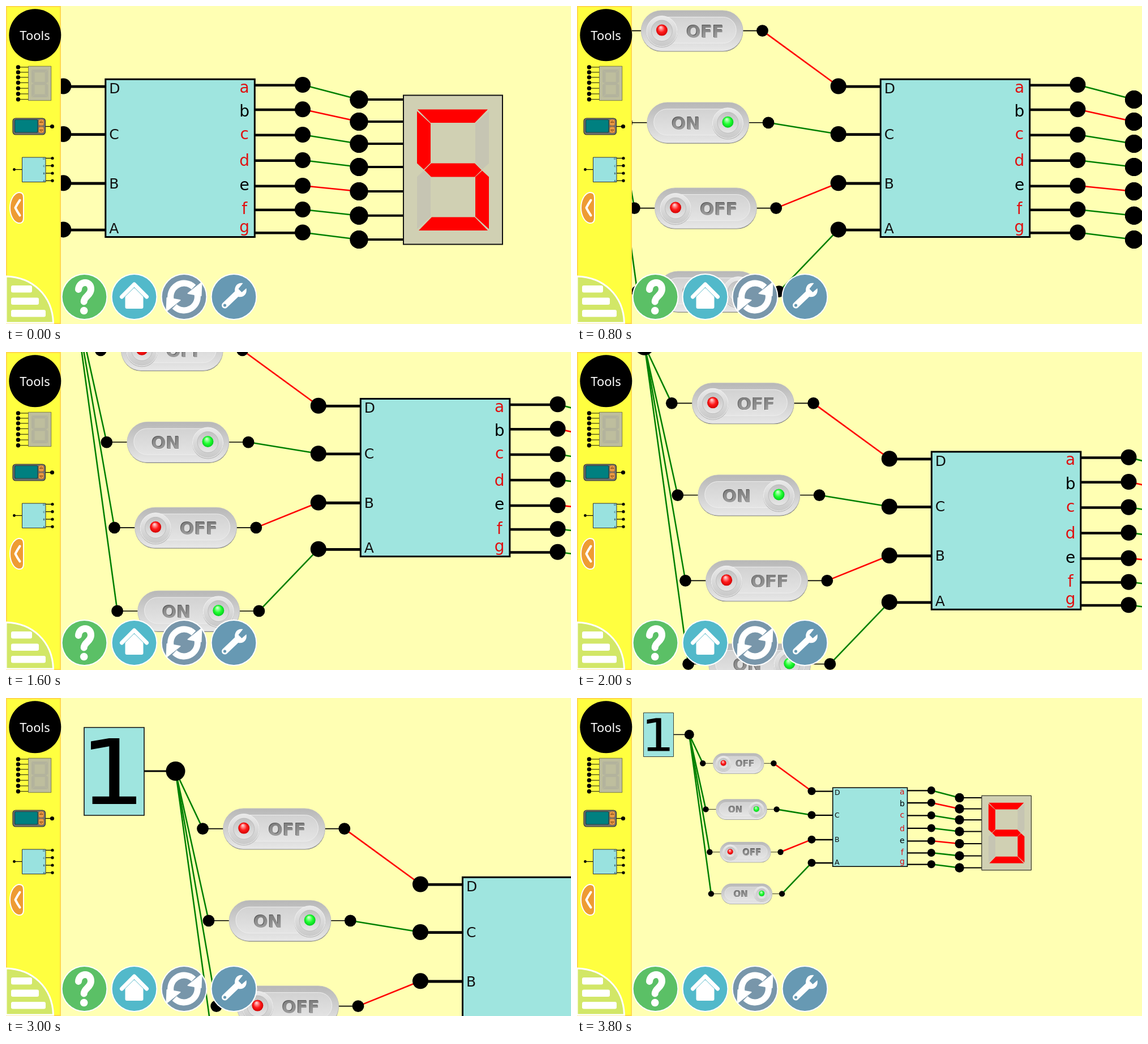
An HTML page with a canvas for the animation above (4400 ms loop, 998 by 561 pixels).

```html
<!DOCTYPE html>
<html lang="en">
<head>
<meta charset="utf-8">
<title>Seven segment circuit</title>
<style>
html, body { margin: 0; width: 100%; height: 100%; overflow: hidden; background: #ffffb3; }
canvas { display: block; }
</style>
</head>
<body>
<canvas id="stage" width="998" height="561"></canvas>
<script>
const ctx = document.getElementById('stage').getContext('2d');
const W = 998, H = 561, SIDE = 97, LOOP = 4400;
const CYAN = '#9fe5df', GREEN = '#008000', RED = '#ff0000';

// One pan per step, then two zoom-out steps.
const STEP = 200, PAN_X = (W - SIDE) / 10, PAN_Y = H / 12;
const MOVES = 'LLLLLDDUUULLUUU';

function cameraAt(time) {
  let col = 7, row = 4;
  for (const move of MOVES.slice(0, Math.floor(time / STEP))) {
    if (move === 'L') col--;
    else row += move === 'D' ? 1 : -1;
  }
  const zoom = time < 3400 ? 1 : time < 3800 ? 0.75 : 0.5;
  return { zoom, x: SIDE * (1 - zoom) - col * PAN_X, y: -row * PAN_Y };
}

// ---- drawing helpers ----
function paint(fill, stroke, width = 1) {
  if (fill) { ctx.fillStyle = fill; ctx.fill(); }
  if (stroke) { ctx.strokeStyle = stroke; ctx.lineWidth = width; ctx.stroke(); }
}
function disc(x, y, r, fill = '#000', stroke, width) {
  ctx.beginPath();
  ctx.arc(x, y, r, 0, Math.PI * 2);
  paint(fill, stroke, width);
}
function box(x, y, w, h, r, fill, stroke, width) {
  ctx.beginPath();
  ctx.roundRect(x, y, w, h, r);
  paint(fill, stroke, width);
}
function line(x1, y1, x2, y2, width, color = '#000') {
  ctx.beginPath();
  ctx.moveTo(x1, y1);
  ctx.lineTo(x2, y2);
  paint(null, color, width);
}
function poly(points, fill, stroke, width) {
  ctx.beginPath();
  points.forEach(([x, y]) => ctx.lineTo(x, y));
  ctx.closePath();
  paint(fill, stroke, width);
}
function shape(d, fill, stroke, width) {
  const path = new Path2D(d);
  if (fill) { ctx.fillStyle = fill; ctx.fill(path); }
  if (stroke) { ctx.strokeStyle = stroke; ctx.lineWidth = width; ctx.stroke(path); }
}
function label(text, x, y, font, color = '#000', align = 'center') {
  ctx.font = font;
  ctx.textAlign = align;
  ctx.fillStyle = color;
  ctx.fillText(text, x, y);
}
function fade(x1, y1, x2, y2, ...colors) {
  const g = ctx.createLinearGradient(x1, y1, x2, y2);
  colors.forEach((c, i) => g.addColorStop(i / (colors.length - 1), c));
  return g;
}
function at(x, y, scale, draw) {
  ctx.save();
  ctx.translate(x, y);
  ctx.scale(scale, scale);
  draw();
  ctx.restore();
}

// ---- circuit ----
const SOURCE = [299.5, 129];
const CHIP = { x: 806.5, y: 316.3, w: 263.5, h: 278.3 };
const DISPLAY = { x: 1332.7, y: 344.5 };
const SWITCHES = [
  { name: 'D', x: 347.5, y: 230.6, on: false, pin: 328.5, text: 341 },
  { name: 'C', x: 358, y: 392.8, on: true, pin: 413, text: 421.5 },
  { name: 'B', x: 371.7, y: 543.6, on: false, pin: 499.3, text: 508.5 },
  { name: 'A', x: 376.8, y: 690.7, on: true, pin: 581.4, text: 588 }
];
const OUTPUTS = [
  { name: 'a', on: true, pin: 326, text: 339.7, end: 7.5 },
  { name: 'b', on: false, pin: 369.3, text: 382, end: 46.5 },
  { name: 'c', on: true, pin: 414, text: 422, end: 85.5 },
  { name: 'd', on: true, pin: 459, text: 469.3, end: 126.5 },
  { name: 'e', on: false, pin: 504, text: 512, end: 169.5 },
  { name: 'f', on: true, pin: 546, text: 554.3, end: 212.3 },
  { name: 'g', on: true, pin: 586.5, text: 585.5, end: 254.5 }
];
const SEGMENTS = {
  a: [[25, 25], [149, 25], [126, 48.5], [48, 48.5]],
  b: [[151, 28], [127, 50], [127, 119], [139, 131], [151, 120]],
  c: [[139, 133], [151, 144], [151, 236], [127, 214], [127, 144]],
  d: [[27, 238.5], [149, 238.5], [126, 215], [50, 215]],
  e: [[36, 133], [48, 144], [48, 214], [24, 236], [24, 144]],
  f: [[24, 28], [48, 50], [48, 119], [36, 131], [24, 120]],
  g: [[37, 132], [49, 120], [126, 120], [138, 132], [126, 144], [49, 144]]
};

function drawDisplay(lit, face, off) {
  for (const { end } of OUTPUTS) {
    line(-78, end, 0, end, 4);
    disc(-78.5, end, 16);
  }
  box(0, 0, 175, 263, 0, face, '#111', 2);
  for (const { name, on } of OUTPUTS) poly(SEGMENTS[name], lit && on ? RED : off);
}

function drawWires(width) {
  for (const s of SWITCHES) {
    line(...SOURCE, s.x, s.y, width, GREEN);
    line(s.x + 250.3, s.y, 732, s.pin, width, s.on ? GREEN : RED);
  }
  for (const o of OUTPUTS)
    line(1154.7, o.pin, DISPLAY.x - 78.5, DISPLAY.y + o.end, width, o.on ? GREEN : RED);
}

function drawSource() {
  line(244, 129, 299, 129, 3);
  box(138, 52, 106, 155, 0, CYAN, '#111', 1.6);
  shape('M152.6 187V173.8H182.3V85.3L150 90.9V76.6L182 71H200.3V173.8H230V187Z', '#000');
}

function drawSwitch({ x, y, on }) {
  at(x, y, 1, () => {
    line(0, 0, 250, 0, 1.6);
    box(36.5, -34.5, 179.5, 71.5, 35.5, '#777');
    box(36, -35.7, 180, 71.5, 35.7, fade(0, -36, 0, 36, '#b7b7b7', '#cfcfcf', '#e8e8e8'), '#c2c2c2', 0.8);
    box(48, -24, 156, 46, 23, fade(0, -24, 0, 22, '#d2d2d2', '#e4e4e4'), '#eeeeee', 1);

    const knob = on ? 178.7 : 72.7, word = on ? 'ON' : 'OFF', center = on ? 104 : 148.5;
    const font = 'bold 30px "DejaVu Sans", sans-serif';
    label(word, center + 1, 12.5, font, '#f4f4f4');
    label(word, center - 0.2, 11.3, font, '#555');
    label(word, center + 0.8, 12, font, fade(0, -11, 0, 12, '#7c7c7c', '#9c9c9c'));

    disc(knob, 2, 27.5, '#aaa');
    disc(knob, 1, 27, fade(0, -26, 0, 28, '#e9e9e9', '#c9c9c9'), '#f3f3f3', 1);
    disc(knob, 0, 18.5, fade(0, -18, 0, 18, '#c2c2c2', '#e6e6e6'), '#b5b5b5', 0.8);
    const led = ctx.createRadialGradient(knob - 2, -6, 1, knob, -1, 10.5);
    const tones = on ? ['#c8ffc8', '#20ff30', '#00c91b'] : ['#ffcaca', '#ff1a1a', '#cf0000'];
    tones.forEach((c, i) => led.addColorStop([0, 0.55, 1][i], c));
    disc(knob, -1, 10, led);
  });
}

function drawChip() {
  for (const s of SWITCHES) line(732, s.pin + 0.7, CHIP.x, s.pin + 0.7, 4.8);
  for (const o of OUTPUTS) line(1070, o.pin + 0.7, 1154, o.pin + 0.7, 4.6);
  box(CHIP.x, CHIP.y, CHIP.w, CHIP.h, 0, CYAN, '#000', 3);
  for (const s of SWITCHES) label(s.name, 813, s.text, '25px "DejaVu Sans", sans-serif', '#111', 'left');
  for (const o of OUTPUTS)
    label(o.name, 1051.8, o.text, '28px "DejaVu Sans", sans-serif', o.on ? '#e01010' : '#000');
}

function drawTerminals() {
  disc(...SOURCE, 17);
  for (const s of SWITCHES) {
    disc(s.x, s.y, 10.4);
    disc(s.x + 250.3, s.y, 10.4);
    disc(732, s.pin, 14);
  }
  for (const o of OUTPUTS) {
    disc(1154.7, o.pin, 14);
    disc(DISPLAY.x - 78.5, DISPLAY.y + o.end, 16);
  }
}

function drawCircuit({ zoom, x, y }) {
  at(x, y, zoom, () => {
    drawSource();
    SWITCHES.forEach(drawSwitch);
    drawChip();
    at(DISPLAY.x, DISPLAY.y, 1, () => drawDisplay(true, '#d0d0b3', '#c6c5b3'));
    drawWires(2.6 / zoom);
    drawTerminals();
  });
}

// ---- side panel ----
function drawInputIcon() {
  line(69, 212.5, 81, 212.5, 1.3);
  disc(81.5, 212.5, 3.6);
  box(12, 198, 57.5, 29, 5, '#6d7272', '#333', 1.2);
  box(15.5, 200.5, 40.5, 22.5, 2, '#008080', '#243c3c', 1.2);
  for (const [y, tip] of [[200, -3], [213, 3]]) {
    box(57.5, y, 9.5, 11, 3, '#e89a45', '#a8682c', 0.8);
    poly([[59.5, y + 5.5], [62.2, y + 5.5 + tip], [65, y + 5.5]], null, '#7d4312', 0.9);
  }
}

function drawDecoderIcon() {
  const rows = [268.5, 281.7, 295, 308.2];
  line(14.5, 288.5, 28, 288.5, 1.2);
  disc(14.5, 288.5, 2.4);
  for (const y of rows) {
    line(70, y, 82, y, 1.2);
    disc(82, y, 2.6);
  }
  box(28.5, 267, 41.5, 43.5, 0, '#99e2df', '#333', 1);
  rows.forEach((y, i) => label('DCBA'[i], 67, y + 2, '4.5px "DejaVu Sans", sans-serif', '#123'));
}

function drawPanel() {
  box(0, 0, SIDE, H, 0, '#ffff40');
  ctx.strokeStyle = '#ffd94a';
  ctx.lineWidth = 2;
  ctx.strokeRect(1, 1, SIDE - 2, H - 2);
  disc(51.3, 51.3, 46);
  label('Tools', 51, 60, '22px "Noto Sans", sans-serif', '#fff');
  at(39.5, 106.2, 0.23, () => drawDisplay(false, '#bebe9e', '#b3b39d'));
  drawInputIcon();
  drawDecoderIcon();
  shape('M22 329Q31 328 31 338V374Q31 384 22 383C13 381 7 369 7 356S13 331 22 329Z', '#ee9b33', '#fff', 2);
  ctx.lineCap = ctx.lineJoin = 'round';
  shape('M24.5 342.5Q20 349 16.5 356Q20 363 24.5 369.5', null, '#fff', 4);
  ctx.lineCap = 'butt';
  ctx.lineJoin = 'miter';
}

// ---- bottom bar ----
function drawMenu() {
  shape('M0 477C46 478 82 510 83.5 559H0Z', '#d2e767', '#fff', 3);
  [[493, 37], [514.5, 49], [536, 61]].forEach(([y, w]) => box(9, y, w, 12.5, 3, '#fff'));
}

function drawHelp() {
  shape('M-10.5 -13C-9 -29 12 -29 11.5 -13C11 -2 -0.5 -1 -0.8 8.5', null, '#fff', 12);
  disc(-0.8, 24.5, 6.8, '#fff');
}
function drawHome() {
  shape('M-13 1L0 -12L13 1V18H-13Z', '#fff', '#fff', 6);
  shape('M-22 0L0 -22L22 0', null, '#fff', 7);
}
function drawReload() {
  ctx.lineCap = 'butt';
  for (let i = 0; i < 2; i++) {
    shape('M-22.5 8A24 24 0 0 1 17 -17', null, '#fff', 11);
    shape('M31 -25L30 -2L7 -6Z', '#fff', '#fff', 2);
    ctx.rotate(Math.PI);
  }
}
function drawWrench(color) {
  shape('M-16 15L6 -6', null, '#fff', 11);
  shape('M16 -24C7 -26 0 -19 2 -8L8 0C17 2 24 -5 22 -15L14 -8L8 -14Z', '#fff');
  disc(-16, 15, 2.6, color);
}

function drawBar() {
  drawMenu();
  const buttons = [['#5bc066', drawHelp], ['#52b9ca', drawHome], ['#7896aa', drawReload], ['#6799b3', drawWrench]];
  buttons.forEach(([color, icon], i) => at(138.5 + 88 * i, 513, 1, () => {
    disc(0, 0, 41, '#fff');
    disc(0, 0, 38.9, color);
    ctx.lineCap = ctx.lineJoin = 'round';
    icon(color);
  }));
}

function frame(now) {
  ctx.fillStyle = '#ffffb3';
  ctx.fillRect(0, 0, W, H);
  drawCircuit(cameraAt(now % LOOP));
  drawPanel();
  drawBar();
  requestAnimationFrame(frame);
}
requestAnimationFrame(frame);
</script>
</body>
</html>
```
